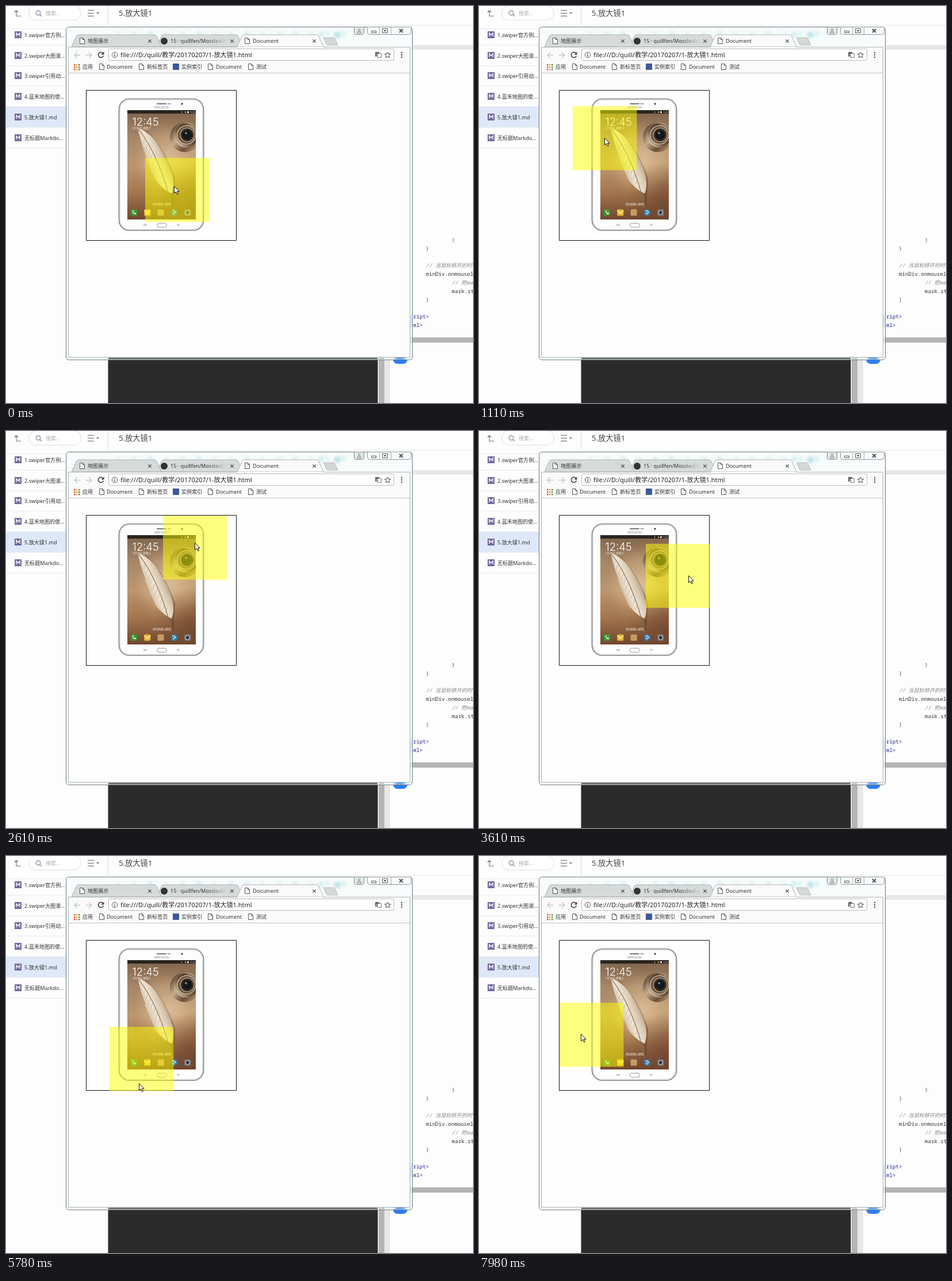
An HTML page with a canvas that plays this animation: 812x690 px, repeating every 8000 ms.

```html
<!DOCTYPE html>
<html lang="zh-CN">
<head>
<meta charset="utf-8">
<title>放大镜</title>
<style>
html, body { margin: 0; width: 100%; height: 100%; overflow: hidden; background: #fdfdfd; }
canvas { display: block; }
</style>
</head>
<body>
<canvas id="stage" width="812" height="690"></canvas>
<script>
const W = 812, H = 690, LOOP = 8000;
const SANS = '"Noto Sans", "Noto Sans CJK SC", sans-serif';
const MONO = '"Noto Sans Mono", "Noto Sans CJK SC", monospace';
const PAPER = '#fdfdfd';
const view = document.getElementById('stage').getContext('2d');
const scene = document.createElement('canvas');
scene.width = W;
scene.height = H;
const g = scene.getContext('2d');

function rect(x, y, w, h, color) {
  g.fillStyle = color;
  g.fillRect(x, y, w, h);
}

function paint(fill, stroke, width = 1) {
  if (fill) { g.fillStyle = fill; g.fill(); }
  if (stroke) { g.strokeStyle = stroke; g.lineWidth = width; g.stroke(); }
}

function round(x, y, w, h, r, fill, stroke, width) {
  g.beginPath();
  g.roundRect(x, y, w, h, r);
  paint(fill, stroke, width);
}

function circle(x, y, r, fill, stroke, width) {
  g.beginPath();
  g.arc(x, y, r, 0, Math.PI * 2);
  paint(fill, stroke, width);
}

function shape(d, fill, stroke, width = 1) {
  const p = new Path2D(d);
  if (fill) { g.fillStyle = fill; g.fill(p); }
  if (stroke) { g.strokeStyle = stroke; g.lineWidth = width; g.stroke(p); }
}

function text(s, x, y, size, color = '#333', family = SANS, style = '') {
  g.font = `${style} ${size}px ${family}`;
  g.fillStyle = color;
  g.fillText(s, x, y);
}

function gradient(grad, ...colors) {
  colors.forEach((c, i) => grad.addColorStop(i / (colors.length - 1), c));
  return grad;
}

function fileIcon(x, y) {
  shape(`M${x} ${y}h5l3 3v7h-8zM${x + 5} ${y}v3h3`, '#fff', '#555');
}

function cross(x, y, r, color, width) {
  shape(`M${x - r} ${y - r}l${2 * r} ${2 * r}m0 ${-2 * r}l${-2 * r} ${2 * r}`, null, color, width);
}

function drawNotes() {
  rect(0, 0, W, H, PAPER);
  shape('M15.5 8.5h5M18 8.5v9h8M15 11l3-3 3 3', null, '#77778a', 1.2);
  round(39.5, -.5, 91, 25, 12.5, '#fff', '#dedede');
  circle(56, 12, 3.8, null, '#8792a8', 1.4);
  shape('M59 15l3 3', null, '#8792a8', 1.5);
  text('搜索...', 69, 16, 9, '#aaa');
  for (let y = 7; y < 18; y += 5) rect(142, y, 11, 1, '#666');
  shape('M157 11h5l-2.5 3z', '#777');
  rect(177, 0, 1, 34, '#e2e2e2');
  rect(178, 33, W - 178, 1, '#e4e4e4');
  rect(0, 39, 105, 1, '#e9e9e9');
  text('5.放大镜1', 196, 17, 13.2, '#444');

  const notes = ['1.swiper官方例...', '2.swiper大图滚...', '3.swiper引用动...',
    '4.蓝禾地图的使...', '5.放大镜1.md', '无标题Markdo...'];
  notes.forEach((name, i) => {
    const y = Math.round(50 + i * 35.7);
    if (i === 4) rect(0, y - 18, 105, 36, '#dfe8f8');
    rect(0, y + 17.5, 105, 1, '#e9e9e9');
    rect(15, y - 6, 12, 12, '#74689c');
    shape(`M18 ${y + 3}v-6l3 3.5 3-3.5v6`, null, '#fff', 1.3);
    text(name, 32, y + 4, 9.1);
  });

  rect(707, 68, 105, 8, '#e7e7e7');
  rect(707, 576, 105, 9, '#b4b4b4');
  rect(177.5, 612, 469, 78, '#2b2b2b');
  rect(648, 612, 10, 78, '#b5b5b5');
  rect(658, 612, 10, 78, '#e7e7e7');
  round(673, 600, 25, 22, 8, '#2f7df2');

  const code = (s, x, y, c = '#333', style) => text(s, x, y, 9.17, c, MONO, style);
  code('}', 775, 410, '#555f45');
  code('}', 730, 425, '#555f45');
  code('// 当鼠标移开的时候', 730, 454, '#888', 'italic');
  code('minDiv.onmouseleave', 730, 469);
  code('// 把mask隐藏', 775, 484, '#888', 'italic');
  code('mask.style', 775, 499);
  code('}', 730, 514, '#555f45');
  code('ript>', 708, 543, '#20208c');
  code('ml>', 708, 558, '#20208c');
}

function drawTabs() {
  const tab = (x, w, fill) =>
    shape(`M${x} 71l8-18q1-3 4-3h${w - 24}q3 0 4 3l8 18z`, fill, '#aab4b4');
  tab(262, 150, '#d6dbda');
  tab(114, 156, '#d6dbda');
  tab(402, 150, '#fafafa');
  shape('M552 55h17q2 0 3 2l5 11h-17q-2 0-3-2z', '#d4d9d8', '#b5bcbb');
  fileIcon(128.5, 55.5);
  circle(275, 61, 6, '#333');
  fileIcon(415.5, 55.5);
  text('地图展示', 142, 64, 9.1);
  const fade = gradient(g.createLinearGradient(286, 0, 385, 0), '#333', '#333', '#333', '#d6dbda');
  g.save();
  g.beginPath();
  g.rect(286, 50, 98, 20);
  g.clip();
  text('15 · quillfen/MossleaImg', 286, 64, 9.1, fade);
  g.restore();
  text('Document', 429, 64, 9.2);
  for (const x of [250, 393, 536]) cross(x, 61, 2.7, '#444', 1.2);
}

function drawBrowser() {
  round(104.5, 36.5, 602, 578.5, 5, '#f8fbfb');
  g.save();
  g.clip();
  g.filter = 'blur(2px)';
  for (let i = 0; i < 15; i++) circle(195 + i * 28, 48, 3 + i % 3, '#dcf2f2');
  circle(576, 50, 6, '#bfe6e8');
  circle(548, 49, 5, '#d0eeee');
  circle(685, 612, 9, '#5b9cf4');
  rect(703, 537, 4, 22, '#b9d8ee');
  rect(703, 576, 4, 9, '#c4c9c9');
  g.filter = 'blur(.6px)';
  rect(178, 611.5, 468, 2.5, '#484c4c');
  rect(648, 611.5, 10, 2.5, '#bcc0c0');
  g.filter = 'none';
  g.restore();
  round(105.5, 37.5, 600, 576.5, 4, null, '#ffffffb0');
  round(104.5, 36.5, 602, 578.5, 5, null, '#66777a');

  round(605.5, 36.5, 17, 13, [0, 0, 3, 3], '#e3e8e8', '#7e8989');
  circle(614, 41.5, 1.7, null, '#888');
  shape('M610.5 47q0-3 3.5-3t3.5 3z', null, '#888');
  round(628.5, 36.5, 76, 13, [0, 0, 4, 4], '#f7fafa', '#8a9696');
  shape('M649.5 37v12M669.5 37v12', null, '#a5afaf');
  round(635.5, 43.5, 8, 3, 0, '#fff', '#555');
  round(654.5, 39.5, 9, 7, 0, '#fff', '#555');
  rect(657, 42, 4, 2, '#555');
  cross(687, 43, 3, '#555', 2);

  rect(109, 71, 594, 540, PAPER);
  drawTabs();
  rect(109, 71, 594, 45, '#fafafa');
  shape('M109 71.5H402M552 71.5H703', null, '#aab4b4');
  shape('M129 85.5h-10m5-5l-5 5 5 5M139 85.5h10m-5-5l5 5-5 5', null, '#c6c6c6', 1.3);
  shape('M168.6 82A4.6 4.6 0 1 0 169.4 86.5', null, '#444', 1.6);
  shape('M170.5 79.5v5h-5z', '#444');
  round(178.5, 74.5, 496, 20, 2, '#fff', '#b9b9b9');
  circle(189, 85, 4.7, null, '#555');
  rect(188.4, 84, 1.3, 4, '#555');
  rect(188.4, 82, 1.3, 1.3, '#555');
  text('file:///D:/quill/教学/20170207/1-放大镜1.html', 199, 88.5, 11, '#222');
  rect(642, 80, 7, 8, '#666');
  round(646.5, 82.5, 6, 7, 0, '#fff', '#777');
  text('文', 643, 87, 5, '#fff');
  shape('M663.5 80l1.5 3.4 3.7.3-2.8 2.4.9 3.6-3.3-1.9-3.3 1.9.9-3.6-2.8-2.4 3.7-.3z', null, '#444');
  for (let y = 81; y < 91; y += 4) circle(688, y, 1.2, '#444');

  const dots = ['#db4a3a', '#e9a52c', '#3f9c55', '#3b78d8'];
  for (let i = 0; i < 9; i++)
    rect(118 + i % 3 * 4, 101 + Math.floor(i / 3) * 4, 2.5, 2.5, dots[(i + Math.floor(i / 3)) % 4]);
  text('应用', 133, 109, 9.1);
  for (const x of [162.5, 231.5, 351.5, 421.5]) fileIcon(x, 100.5);
  rect(290, 100, 11, 11, '#3b5998');
  text('Document', 175, 109, 9.2);
  text('新标签页', 245, 109, 9.1);
  text('实例索引', 305, 109, 9.1);
  text('Document', 365, 109, 9.2);
  text('测试', 435, 109, 9.1);
  rect(109, 116, 594, 1, '#c4c4c4');
  shape('M108.5 71V610.5H702.5V71', null, '#a9b3b5');
}

function drawWallpaper() {
  g.save();
  g.beginPath();
  g.rect(211, 181, 119, 190);
  g.clip();
  rect(211, 181, 119, 190,
    gradient(g.createLinearGradient(0, 181, 0, 371), '#7f634b', '#a88a6b', '#c09c76', '#a5774f', '#70472f'));
  rect(211, 181, 119, 190,
    gradient(g.createRadialGradient(285, 265, 5, 285, 265, 85), '#e6cca5a0', '#d3ae8055', '#6d422800'));
  rect(211, 181, 119, 190,
    gradient(g.createRadialGradient(330, 345, 5, 330, 345, 75), '#6a412cb0', '#6a412c00'));

  // metal ring, lit from the left, and its dark centre
  circle(311, 228, 26,
    gradient(g.createLinearGradient(288, 215, 330, 254), '#6d5240', '#c6ab88', '#6a4c38', '#c3a27c'));
  circle(313, 225, 21,
    gradient(g.createLinearGradient(292, 240, 332, 205), '#efe0c6', '#7c6049', '#4c392d', '#cfb595'));
  circle(314, 224, 16, '#66503f', '#cdb696', 1.5);
  circle(315, 224, 12, '#322924', '#9d8972', 2);
  circle(315, 224, 8, '#14181a');
  circle(313, 221, 2, '#748083');

  // feather: shadow, vane, shaft and barbs
  shape('M243 216Q276 246 294 300L291 354L286 326Z', '#5f3f2870');
  shape('M229 212Q235 240 243 258L241 257Q250 283 259 299L257 298Q269 317 288 326Q293 314 290 296Q284 270 264 241Q250 219 229 212',
    gradient(g.createLinearGradient(244, 272, 282, 256), '#cdb99e', '#efe5d5', '#d8c8b0', '#a58c72'));
  shape('M230 213Q270 266 289 353', null, '#806a54', 1.2);
  for (let i = 0; i < 10; i++)
    shape(`M${242 + i * 4.2} ${231 + i * 8.5}l-3 ${9 + i % 3}`, null, '#b29c80', .6);
  rect(211, 181, 119, 6, '#292420');
  g.restore();
}

function drawApps() {
  ['#3d9b38', '#e7b936', '#c89b62', '#347da9', '#777b80'].forEach((c, i) => {
    const x = 222.5 + i * 23.3;
    if (i === 3) circle(x, 359, 5.8, c);
    else round(x - 5.5, 353.5, 11, 11, 1.5, c);
  });
  shape('M220 356q0 5 5 6l1-2-2-1-1 1-2-2 1-1-1-2z', '#fff');
  shape('M240.5 356l5.3 4 5.3-4', null, '#fff4c9', 1.5);
  shape('M289 356l4 0 2 3-4 1 1 3', null, '#bddceb', 1.5);
  circle(315.7, 359, 3.4, '#25292c', '#ddd');
}

function drawTablet() {
  round(139.5, 146.5, 261, 261, 0, '#fefefe', '#111');
  round(196.5, 161.5, 147, 228.5, 18, '#fdfdfd', '#808080', 1.7);
  round(198.3, 163.2, 143.4, 225, 16, null, '#d4d4d4');
  round(262, 169, 17, 2, 1, '#777');
  circle(282, 170, .9, '#444');
  circle(285, 170, .9, '#444');
  circle(306, 170, 1.5, '#222');
  text('MERUVON', 258, 178, 5, '#858585');
  drawWallpaper();
  rect(305, 183, 1, 3, '#bbb');
  rect(311, 183, 2, 3, '#b59c32');
  rect(315, 183, 3, 3, '#ddd');
  text('12:45', 320, 186, 3.5, '#ddd');
  text('12:45', 219.5, 208, 18.5, '#fff', 'Inter, sans-serif', '300');
  text('2月10日 星期六', 220, 214, 4.6, '#f5eee5');
  text('滑动屏幕以解锁', 255, 346, 4.5, '#f4e9dd');
  drawApps();
  round(262.5, 377.5, 17, 7, 3.5, '#fff', '#999');
  shape('M239 379.5h6m-6 2h6M297 379.5h4v2h-3', null, '#aaa');
}

// time, mask x, mask y, pointer x, pointer y; mask is clamped to the box later
const PATH = [
  [0, 242, 264, 292, 313],
  [450, 190, 212, 243, 267],
  [1110, 163, 174, 218, 229],
  [1830, 179, 152, 236, 206],
  [2220, 263, 147, 318, 200],
  [2610, 273, 139, 328, 194],
  [2910, 303, 156, 358, 211],
  [3220, 303, 156, 358, 211],
  [4300, 325, 317, 380, 372],
  [4610, 325, 317, 380, 372],
  [4730, 323, 322, 378, 377],
  [5660, 192, 338, 246, 393],
  [5780, 180, 340, 231, 395],
  [6410, 100, 340, 155, 395],
  [6560, 100, 340, 155, 395],
  [7160, 45, 310, 100, 365],
  [7470, 45, 310, 100, 365],
  [7980, 122, 255, 177, 309]
];

// first step, last step, number of steps
const MOVES = [
  [150, 1110, 8], [1260, 2220, 8], [2340, 2610, 3], [2760, 2910, 2], [3340, 4300, 8],
  [4730, 5660, 8], [5780, 6410, 6], [6680, 7160, 5], [7590, 7980, 4]
];

function stepTime(t) {
  let last = 0;
  for (const [from, to, n] of MOVES) {
    for (let i = 0; i < n; i++) {
      const at = Math.min(to, from + Math.ceil((to - from) * i / (n - 1) / 30) * 30);
      if (at > t) return last;
      last = at;
    }
  }
  return last;
}

function poseAt(t) {
  const i = PATH.findIndex(k => k[0] >= t);
  if (i < 1) return PATH[0].slice(1);
  const a = PATH[i - 1], b = PATH[i], f = (t - a[0]) / (b[0] - a[0]);
  return a.slice(1).map((v, j) => Math.round(v + (b[j + 1] - v) * f));
}

const clamp = (v, lo, hi) => Math.max(lo, Math.min(hi, v));
const arrow = new Path2D('M.5 .5V12.5L3.3 10 5.5 14.5 7.4 13.6 5.3 9.3H9z');

function draw(t) {
  const [mx, my, x, y] = poseAt(stepTime(t));
  view.drawImage(scene, 0, 0);
  if (x >= 139 && x <= 401 && y >= 146 && y <= 408) {
    view.fillStyle = 'rgba(255, 255, 0, .5)';
    view.fillRect(clamp(mx, 140, 290), clamp(my, 147, 297), 111.4, 111.4);
  }
  view.save();
  view.translate(x, y);
  view.fillStyle = '#fff';
  view.strokeStyle = '#111';
  view.fill(arrow);
  view.stroke(arrow);
  view.restore();
}

drawNotes();
drawBrowser();
drawTablet();
draw(0);
const start = performance.now();
function tick() {
  draw((performance.now() - start) % LOOP);
  requestAnimationFrame(tick);
}
requestAnimationFrame(tick);
</script>
</body>
</html>
```
